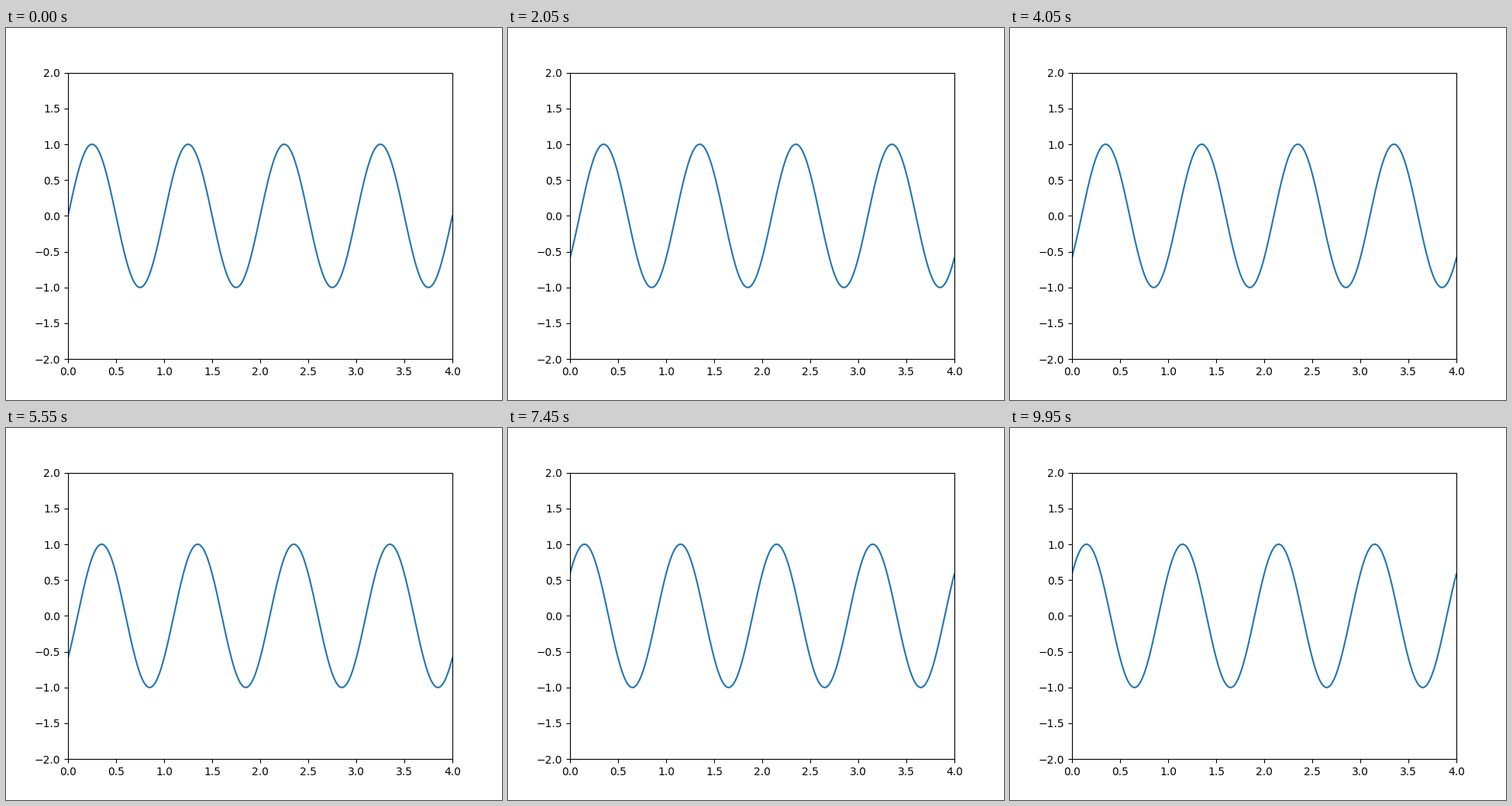
Animation, 640 px wide and 480 px high, one loop 10 s. Source, as a matplotlib script:

```python
import numpy as np
import matplotlib.pyplot as plt
from matplotlib.animation import FuncAnimation

FRAMES = 200
INTERVAL = 50  # ms
SHIFT = 0.1    # distance the wave travels per frame

fig = plt.figure(figsize=(6.4, 4.8), dpi=100)
ax = plt.axes(xlim=(0, 4), ylim=(-2, 2))
x = np.linspace(0, 4, 1000)
line, = ax.plot([], [])


def update(i):
    line.set_data(x, np.sin(2 * np.pi * (x - SHIFT * i)))
    return line,


anim = FuncAnimation(fig, update, frames=FRAMES, interval=INTERVAL,
                     init_func=lambda: update(0), repeat=True, repeat_delay=0)

plt.show()
```
